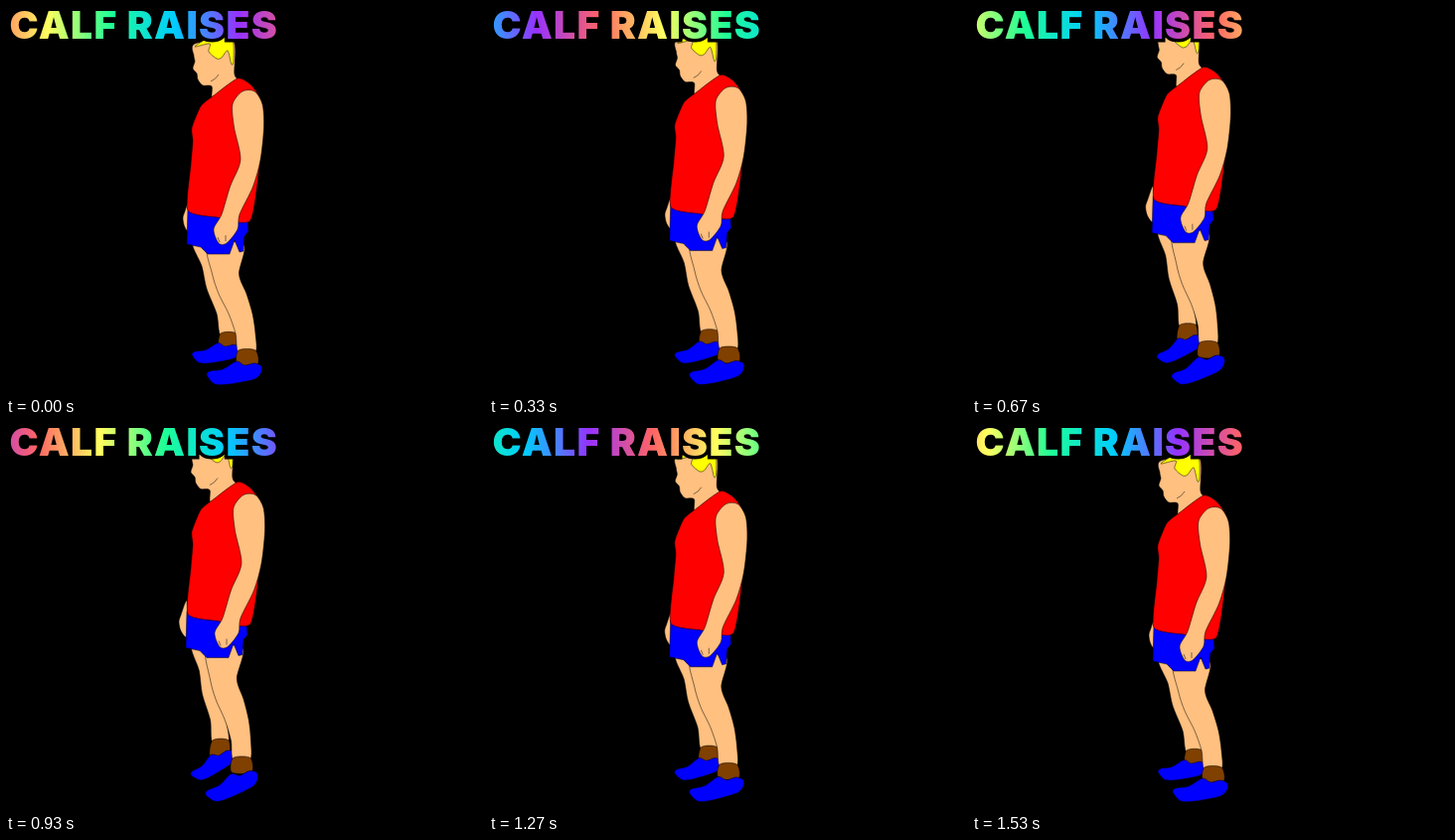
Recreate the animation shown at these times as an HTML page. Size 480x392 px, loop 1.59 s.

```html
<!DOCTYPE html>
<html lang="en">
<head>
<meta charset="utf-8">
<title>Calf raises</title>
<style>
  html, body { margin: 0; width: 100%; height: 100%; overflow: hidden; background: #000; }
  svg { display: block; width: 480px; height: 392px; }
  path { stroke: #000; stroke-width: .5; stroke-linejoin: round; }
  text {
    font: 900 39px Inter, sans-serif; letter-spacing: 1.35px;
    paint-order: stroke; stroke: #000; stroke-width: 7px;
  }
</style>
</head>
<body>
<svg viewBox="0 0 480 392">
  <defs>
    <linearGradient id="rainbow" gradientUnits="userSpaceOnUse" x1="0" x2="320" y1="0" y2="0" spreadMethod="repeat">
      <stop offset="0" stop-color="#ffff5f"/>
      <stop offset=".2" stop-color="#1eff96"/>
      <stop offset=".4" stop-color="#00ccff"/>
      <stop offset=".6" stop-color="#9632ff"/>
      <stop offset=".8" stop-color="#ff6464"/>
      <stop offset="1" stop-color="#ffff5f"/>
    </linearGradient>
  </defs>
  <g id="figure"></g>
  <rect width="280" height="32"/>
  <text x="3.5" y="32.5" fill="url(#rainbow)">CALF RAISES</text>
</svg>
<script>
const LOOP = 1590, FRAMES = 24, LIFT = 13.5, HIP = 240, PERIOD = 320;
const SKIN = '#ffc080', RED = '#f00', BLUE = '#00f', BROWN = '#804000', YELLOW = '#ff0';
const figure = document.getElementById('figure');
const rainbow = document.getElementById('rainbow');
const moving = [];

const points = s => s.split(' ').map(p => p.split(',').map(Number));

// Closed curve through the points; round 0 keeps straight sides.
function outline(pts, round = .14) {
  const at = i => pts[(i + pts.length) % pts.length];
  return 'M' + pts[0] + pts.map((p, i) => {
    const [a, c, e] = [at(i - 1), at(i + 1), at(i + 2)];
    const leave = p.map((v, j) => v + round * (c[j] - a[j]));
    const reach = c.map((v, j) => v - round * (e[j] - p[j]));
    return `C${leave} ${reach} ${c}`;
  }).join('') + 'Z';
}

// Limb from joints given as x,y,half-width.
function limb(joints) {
  const j = points(joints);
  return outline([...j.map(([x, y, w]) => [x - w, y]), ...j.reverse().map(([x, y, w]) => [x + w, y])]);
}

function add(d, fill, move) {
  const el = document.createElementNS('http://www.w3.org/2000/svg', 'path');
  el.setAttribute('d', d);
  el.setAttribute('fill', fill);
  figure.append(el);
  moving.push({ el, move });
}

const lift = (drift = 0) => r => `translate(${drift * r} ${-LIFT * r})`;

// A leg hangs from the hip and leans forward, stretching a little less than the heel rises.
const lean = k => r =>
  `matrix(1 0 ${k * r} ${1 + .037 * r} ${-(1 + k * HIP) * r} ${-(LIFT + .037 * HIP) * r})`;

// A shoe pivots on the ball of the foot.
const tilt = (x, y, size, angle) => r => `translate(${x} ${y}) rotate(${-angle * r}) scale(${size})`;

const shoe = outline(points('-10,-5 -7,-9 6,-11 20,-19 28,-15 38,-17 45,-14 45,-8 38,-1 13,4 -2,4'));

function leg(joints, sock, k, foot) {
  add(limb(joints), SKIN, lean(k));
  add(limb(sock), BROWN, lean(k));
  add(shoe, BLUE, tilt(...foot));
}

add(outline(points('186,193 180,207 178,214 180,223 186,228')), SKIN, lift(-4));
leg('202,238,14 207,262,10 212,285,10 220,310,8 224,332,8', '224,330,8 224,346,9', -.078, [196, 356, .87, 21]);
leg('221,240,18 221,270,13.5 228,290,14 236,310,12 241,330,10 242.5,349,8.5', '242.5,347,8.5 243,361,10', -.04, [212, 377, 1, 15]);
add(outline(points('183,203 182,240 196,243 203,250 225,250 230,236 235,248 239,247 240,232 244,227 243,213'), 0), BLUE, lift(-1));
add(outline(points('190,38 189,50 190,56 188,63 192,68 193,74 198,80 207,81 209,94 236,78 230,69 228,34')), SKIN, lift(-2));
add(outline(points('190,41 207,31 227,32 229,54 227,59 223,45 217,52 212,53 204,46 205,38')), YELLOW, lift(-1));
add('M206 76Q211 74 214 69', 'none', lift(-1));
add(outline(points('208,91 233,73 247,80 257,98 256,150 246,216 213,213 183,206 186,160 188,136 187,123 196,101'), .1), RED, lift());
add(limb('244,86,6 243,99,15 244.5,122,15 246,155,10 237,182,11.5 226,210,9 221,225,12 218,239,4'), SKIN, lift(1));
add('M213 233L215 238M221 231V237', 'none', lift(1));

const ease = (a, b, x) => {
  const u = Math.max(0, Math.min(1, (x - a) / (b - a)));
  return u * u * (3 - 2 * u);
};

// Fifteen steps a second, on a clock of hundredths.
const stepAt = ms => Math.floor((Math.floor(ms % LOOP / 10) * 3 + 1) / 20) % FRAMES;

function draw(now) {
  const step = stepAt(now);
  const rise = ease(1, 13, step) - ease(14, 22, step);
  for (const { el, move } of moving) el.setAttribute('transform', move(rise));
  const x = 42 + step * PERIOD / 12;
  rainbow.setAttribute('x1', x);
  rainbow.setAttribute('x2', x + PERIOD);
  requestAnimationFrame(draw);
}
draw(performance.now());
</script>
</body>
</html>
```
